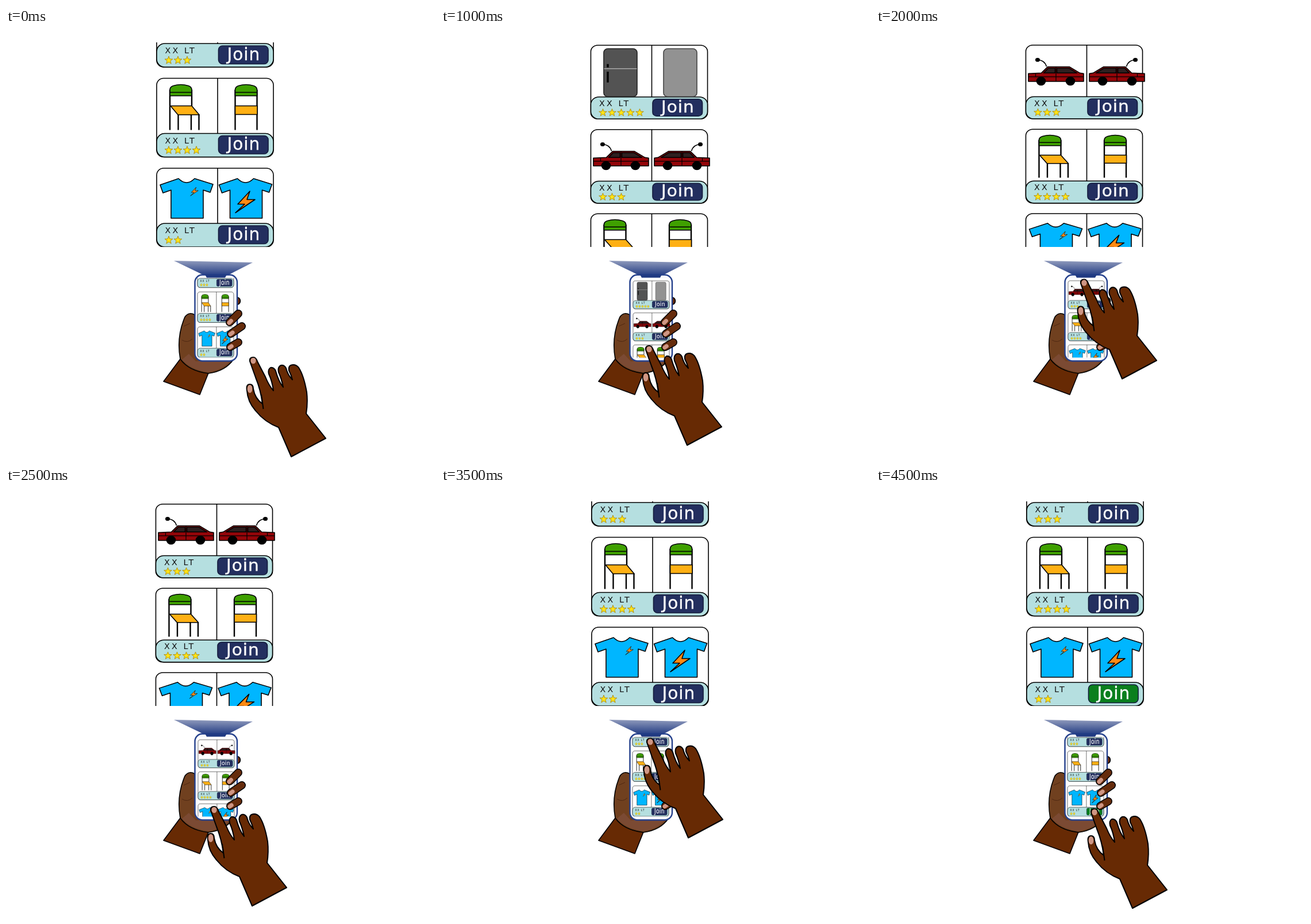
An HTML page that plays this animation: 746x750 px, repeating every 5 s.

```html
<!DOCTYPE html>
<html lang="en">
<head>
<meta charset="utf-8">
<title>Scrolling a shop feed</title>
<style>
html, body { margin: 0; width: 100%; height: 100%; overflow: hidden; background: #fff; }
svg { display: block; }
text { font-family: "DejaVu Sans", sans-serif; }
</style>
</head>
<body>
<svg id="stage" width="746" height="750" viewBox="0 0 746 750" stroke-linejoin="round"></svg>
<script>
const STEP = 500;
const CARD_PITCH = 156.5;

// Feed layouts: the finished feed is shown a little taller than the scrolling one.
const scrolling = y => ({ x: 260.5, y, scaleY: 0.937, phone: 'translate(334 438.1) scale(.31 .38) translate(-260.5 -25)' });
const settled = { x: 262, y: -225.5, scaleY: 1, phone: 'translate(333 435) scale(.31 .388) translate(-262 -25)' };

const poses = [
  { hand: [0, 0],      feed: settled },
  { hand: [15, -3],    feed: scrolling(30) },
  { hand: [-68, -20],  feed: scrolling(30) },
  { hand: [-68, -64],  feed: scrolling(-24.5) },
  { hand: [-68, -135.5], feed: scrolling(-117) },
  { hand: [-68, -17],  feed: scrolling(-117) },
  { hand: [-68, -54.5], feed: scrolling(-151.7) },
  { hand: [-66, -135.5], feed: settled },
  { hand: [0, 0],      feed: settled },
  { hand: [-50, -13],  feed: settled, joined: true },
];

function star(cx, cy) {
  const points = Array.from({ length: 10 }, (_, i) => {
    const r = i % 2 ? 3 : 7.2, a = i * Math.PI / 5;
    return `${(cx + r * Math.sin(a)).toFixed(1)},${(cy - r * Math.cos(a)).toFixed(1)}`;
  });
  return `<polygon points="${points.join(' ')}" fill="#ffe414" stroke="#a8860c" stroke-width=".9"/>`;
}

function card(index, stars, picture, buttonId = '') {
  const rating = Array.from({ length: stars }, (_, i) => star(21 + 16 * i, 125.3)).join('');
  return `<g transform="translate(0 ${index * CARD_PITCH})" stroke="#000" stroke-width="1.6">
    <rect width="203" height="137" rx="12" fill="#fff"/>
    <path d="M106 0V96"/>
    <rect y="96" width="203" height="41" rx="14" fill="#b5dfe0"/>
    ${picture}
    <text x="14.5" y="113" font-size="14.3" letter-spacing="3.1" fill="#111" stroke="none">XX LT</text>
    ${rating}
    <rect id="${buttonId || 'button' + index}" x="107.5" y="100" width="86.5" height="31.5" rx="7" fill="#232f5f" stroke="#141c3c"/>
    <text x="122.5" y="124.7" font-size="29.5" letter-spacing="1" fill="#fff" stroke="#fff" stroke-width=".4">Join</text>
  </g>`;
}

const fridge = `
  <rect x="22.5" y="6.5" width="58" height="89" rx="7" fill="#535353" stroke="#222"/>
  <path d="M23 43.5H80" stroke="#aaa"/>
  <path d="M29.5 35V41M29.5 49V69" stroke-width="3.4"/>
  <rect x="126.5" y="6.5" width="58" height="89" rx="7" fill="#929292" stroke="#444"/>`;

const carSide = `
  <path d="M20.5 27.5Q33 28 36 40" fill="none"/>
  <ellipse cx="20.5" cy="27.5" rx="3.2" ry="2.8"/>
  <path d="M4.5 53L27 52L38 40.5H76L94 52L100.5 53V67.5H4.5Z" fill="#930509"/>
  <path d="M31 52L39 43H51V52ZM54 52V43H75L89 52Z" fill="#2e2020"/>
  <path d="M4.5 59H100.5M52.5 41V67M17 53V59" stroke-width="1.2"/>
  <circle cx="26.5" cy="67" r="7.5"/><circle cx="77.5" cy="67" r="7.5"/>`;
const car = `<g>${carSide}</g><g transform="translate(211 0) scale(-1 1)">${carSide}</g>`;

const chairBack = `
  <path d="M23 30.5V20Q23 15 29 13Q42 9 55 13Q61 15 61 20V30.5Z" fill="#3fa000"/>
  <path d="M23 24.5H61"/>`;
const chair = `
  <path d="M23 20V90M61 20V48M37.5 63V90M60 63V90M73.5 63V90" stroke-width="2.4"/>
  ${chairBack}
  <path d="M24 48H61L74 63.5H37Z" fill="#ffb014"/>
  <path d="M136.5 20V90M174.5 20V90" stroke-width="2.4"/>
  <g transform="translate(113.5 0)">${chairBack}</g>
  <rect x="136.5" y="48" width="38.5" height="15" fill="#ffb014"/>`;

const shirtBody = '<path d="M38 18Q52 32 66 18L98 28L93 42L81 38V87H25V38L11 43L6 29Z" fill="#00b6ff"/>';
const bolt = '<path d="M8 -18.5L-13 4H-1L-17 19L17 -4H3Z" fill="#ff8a12"/>';
const shirt = `
  ${shirtBody}<g transform="translate(102.5 0)">${shirtBody}</g>
  <g transform="translate(65.5 40.5) scale(.4)">${bolt}</g>
  <g transform="translate(154 58.5)">${bolt}</g>`;

// A gripping finger runs from its knuckle to a fingertip with a nail.
function finger(x1, y1, x2, y2) {
  const nx = x2 + (x1 - x2) * 0.16, ny = y2 + (y1 - y2) * 0.16;
  const line = (xa, ya, xb, yb, color, width) =>
    `<path d="M${xa} ${ya}L${xb} ${yb}" stroke="${color}" stroke-width="${width}" stroke-linecap="round"/>`;
  return line(x1, y1, x2, y2, '#000', 14) + line(x1, y1, x2, y2, '#662c0c', 11)
    + line(x2 - 1, y2 + 1, nx, ny, '#cf9684', 7);
}

const holdingHand = `
  <g stroke="#000" stroke-width="1.6">
    <path d="M303 576L274 615L337 638L353 598Z" fill="#672a04"/>
    <path d="M328 499Q318 493 311 503Q296 538 303 576Q318 597 352 601Q382 597 396 576L330 540Z" fill="#70401f"/>
    <path d="M306 577Q320 594 351 599Q377 595 389 580H330L318 567Z" fill="#7b4a33" stroke="none"/>
    <path d="M306 543Q316 549 324 541M309 519L320 514" fill="none" stroke="#4f2812" stroke-width="1"/>
    <circle cx="401" cy="475" r="6.5" fill="#672a04"/>
  </g>`;

const phone = `
  <path d="M292 405L429 408L384 431H346Z" fill="url(#beam)"/>
  <rect x="328.5" y="429.5" width="73.5" height="150" rx="13" fill="#f7f8fc" stroke="#24408c" stroke-width="2.4"/>
  <rect x="333" y="435" width="64" height="139" rx="5" fill="#fff"/>
  <path d="M346 429H384L381 434.5H349Z" fill="#203a82"/>`;

const pointingHand = `
  <path d="M424 580Q423 573 430 573Q435 573 438 582L451 607Q457 622 465 631Q463 615 457 602Q455 594 460 591Q466 590 469 597Q474 615 482 625Q479 610 474 599Q472 590 478 587Q484 586 487 592Q490 604 498 612Q496 604 492 596Q491 589 495 587Q503 584 509 591Q518 605 523 634Q525 652 522 671L556 714L496 746L474 695Q450 686 434 666Q420 650 419 631Q417 620 424 620Q430 620 430 628Q433 645 446 654Q443 630 434 608Z"
    fill="#672a04" stroke="#000" stroke-width="2"/>
  <path d="M444 638L447.500 663" stroke="#000" stroke-width="2"/>
  <ellipse cx="430" cy="579" rx="4.6" ry="5.200" fill="#cf9684"/>
  <ellipse cx="424" cy="628" rx="4.400" ry="7" fill="#cf9684"/>`;

const stage = document.getElementById('stage');
stage.innerHTML = `
  <defs>
    <linearGradient id="beam" x2="0" y2="1">
      <stop offset="0" stop-color="#8f9abc"/><stop offset="1" stop-color="#203a82"/>
    </linearGradient>
    <clipPath id="window"><rect x="250" y="25" width="230" height="356"/></clipPath>
  </defs>
  <g id="view" clip-path="url(#window)"><g id="feed">
    ${card(0, 5, fridge)}${card(1, 3, car)}${card(2, 4, chair)}${card(3, 2, shirt, 'joinButton')}
  </g></g>
  ${holdingHand}
  ${phone}
  <use id="phoneView" href="#view"/>
  ${finger(404, 497, 389, 512)}${finger(410, 519, 391, 532)}${finger(404, 547, 390, 555)}
  <g id="hand">${pointingHand}</g>`;

const [feed, phoneView, hand, joinButton] =
  ['feed', 'phoneView', 'hand', 'joinButton'].map(id => document.getElementById(id));
let shown = -1;

function draw() {
  const index = Math.floor(performance.now() / STEP) % poses.length;
  if (index !== shown) {
    shown = index;
    const pose = poses[index], { x, y, scaleY, phone } = pose.feed;
    feed.setAttribute('transform', `translate(${x} ${y}) scale(1 ${scaleY})`);
    phoneView.setAttribute('transform', phone);
    hand.setAttribute('transform', `translate(${pose.hand})`);
    joinButton.setAttribute('fill', pose.joined ? '#0a7f1e' : '#232f5f');
  }
  requestAnimationFrame(draw);
}
draw();
</script>
</body>
</html>
```
